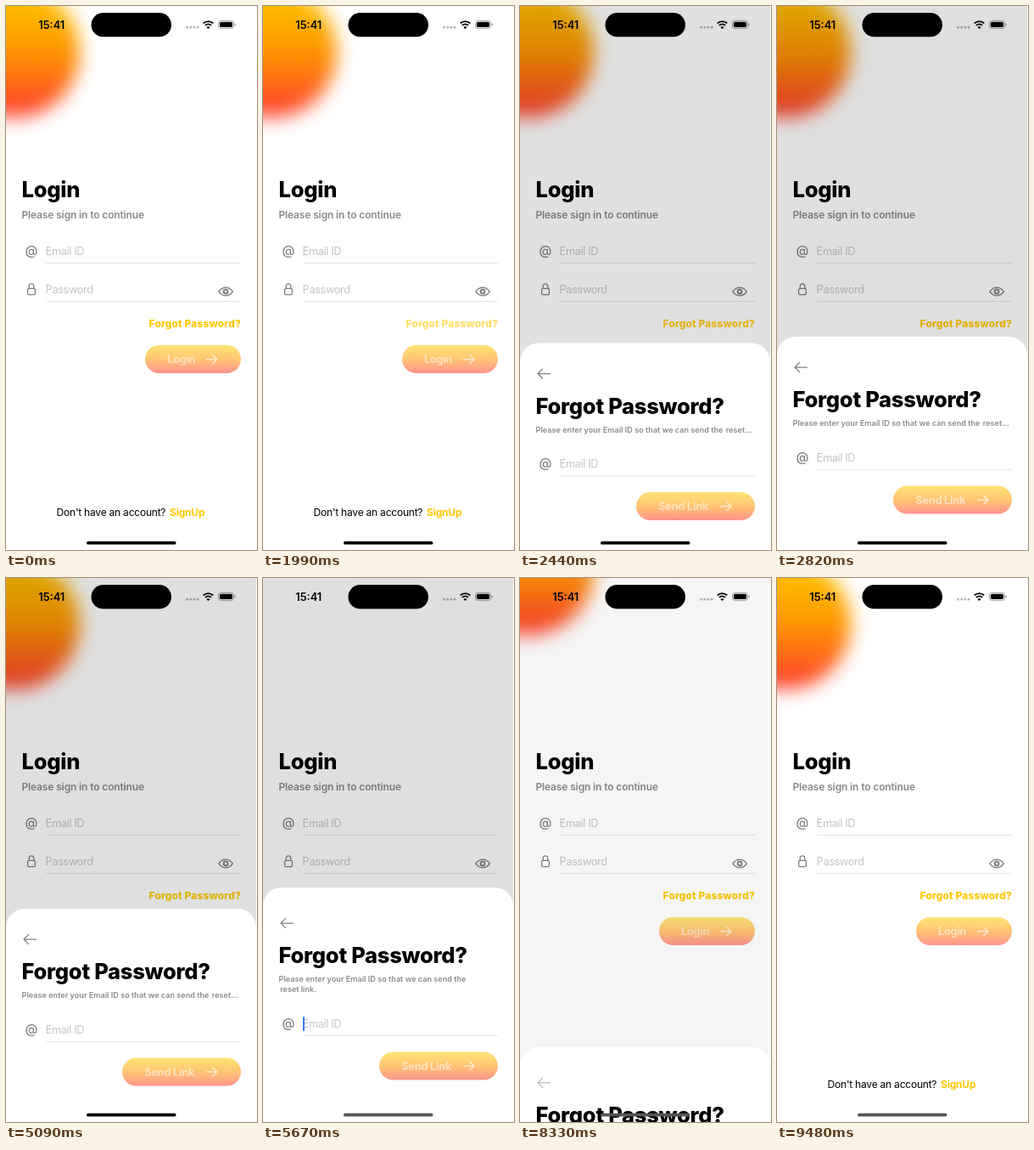
Animation, 296 px wide and 640 px high, one loop 9680 ms. Source, as an HTML page:

```html
<!DOCTYPE html>
<html lang="en">
<head>
<meta charset="utf-8">
<title>Login</title>
<style>
  html, body { margin: 0; width: 100%; height: 100%; overflow: hidden; background: #fff; }
  svg { display: block; font-family: Inter, "Liberation Sans", sans-serif; font-optical-sizing: none; }
  text { white-space: pre; }
  .title { font-size: 25.6px; font-weight: 800; letter-spacing: -.012em; }
  .lead { font-size: 12px; font-weight: 600; letter-spacing: -.011em; fill: #8a8a8e; }
  .hint { font-size: 12.8px; letter-spacing: -.03em; fill: #3c3c43; fill-opacity: .3; }
  .link { font-weight: 800; font-size: 12px; letter-spacing: .01em; fill: #ffc800; }
  .foot { font-size: 12.05px; letter-spacing: -.02em; }
  .foot.link { font-weight: 700; }
  .label { font-size: 12.8px; font-weight: 700; letter-spacing: -.02em; fill: #fff; fill-opacity: .5; }
  .note { font-size: 9.04px; font-weight: 600; letter-spacing: .004em; fill: #8a8a8e; }
  .clock { font-size: 12.8px; font-weight: 600; text-anchor: middle; }
  .at { font-size: 15.2px; font-weight: 500; fill: #808085; text-anchor: middle; }
  .icon { fill: none; stroke: #808085; stroke-width: 1.3; stroke-linecap: round; stroke-linejoin: round; }
  .iris { stroke-width: 2; }
  .rule { stroke: #000; stroke-opacity: .1; }
  .pill { fill: url(#warm); fill-opacity: .55; }
  .go { fill: none; stroke: #fff; stroke-opacity: .65; stroke-width: 1.5; stroke-linecap: round; stroke-linejoin: round; }
</style>
</head>
<body>
<svg width="296" height="640" viewBox="0 0 296 640">
  <defs>
    <linearGradient id="warm" x2="0" y2="1">
      <stop stop-color="#fc0"/>
      <stop offset=".5" stop-color="#ff9500"/>
      <stop offset="1" stop-color="#ff3b30"/>
    </linearGradient>
    <filter id="blur" x="-50%" y="-50%" width="200%" height="200%" color-interpolation-filters="sRGB">
      <feGaussianBlur stdDeviation="11.3"/>
    </filter>
    <path id="arrow" d="M-6.3 0H6M1 -5L6.2 0L1 5"/>
    <g id="email">
      <text class="at" x="30" y="4.6">@</text>
      <text class="hint" x="46.6" y="4.8">Email ID</text>
      <path class="rule" d="M47 14.5H277"/>
    </g>
  </defs>

  <rect width="296" height="640" fill="#fff"/>
  <g id="orb"><circle cx="10" cy="54" r="77" fill="url(#warm)" filter="url(#blur)"/></g>

  <text class="title" x="18.5" y="225">Login</text>
  <text class="lead" x="18.4" y="250.2">Please sign in to continue</text>
  <use href="#email" y="288"/>
  <g class="icon">
    <rect x="25.6" y="332.4" width="8.8" height="7.2" rx="1.4"/>
    <path d="M27.2 332.2V329.8a2.8 2.9 0 0 1 5.6 0v2.4"/>
    <path d="M250.8 336C255.5 329.6 262.7 329.6 267.4 336C262.7 342.4 255.5 342.4 250.8 336Z"/>
    <circle class="iris" cx="259.1" cy="336" r="2.4"/>
  </g>
  <text class="hint" x="46.6" y="337.6">Password</text>
  <path class="rule" d="M47 347.5H277"/>
  <text class="link" id="forgot" x="277" y="377.5" text-anchor="end">Forgot Password?</text>
  <rect class="pill" x="164" y="399" width="113" height="33" rx="16.5"/>
  <text class="label" x="190" y="420.3">Login</text>
  <use class="go" href="#arrow" x="242.7" y="415.7"/>
  <text class="foot" x="59.6" y="600.4">Don't have an account?</text>
  <text class="foot link" x="193" y="600.4">SignUp</text>

  <rect id="dim" width="295" height="640" opacity="0"/>

  <g id="sheet" transform="translate(0 640)">
    <path d="M0 320V22A22 22 0 0 1 22 0H273A22 22 0 0 1 295 22V320Z" fill="#fff"/>
    <g id="head">
      <path id="back" class="icon" d="M35.5 36H21M26.5 30.5L21 36L26.5 41.5"/>
      <text class="title" x="18.5" y="83.2">Forgot Password?</text>
      <text class="note" x="18.6" y="105">Please enter your Email ID so that we can send the</text>
    </g>
    <text class="note" id="wrap">reset<tspan id="dots">...</tspan></text>
    <text class="note" id="tail">link.</text>
    <g id="form">
      <use href="#email" y="142"/>
      <rect id="caret" x="47" y="134" width="2" height="17" rx="1" fill="#2f7cf0"/>
      <rect class="pill" x="137" y="175.5" width="140" height="33" rx="16.5"/>
      <text class="label" x="163.2" y="196.6">Send Link</text>
      <use class="go" href="#arrow" x="242.7" y="192"/>
    </g>
  </g>

  <text class="clock" x="53.8" y="26.6">15:41</text>
  <rect x="100.5" y="8.1" width="94.5" height="28.2" rx="14.1"/>
  <g fill="#000" fill-opacity=".28">
    <circle cx="213.6" cy="25" r="1.6"/><circle cx="217.8" cy="25" r="1.6"/>
    <circle cx="222" cy="25" r="1.6"/><circle cx="226.2" cy="25" r="1.6"/>
  </g>
  <path d="M232.7 20.4a8.4 8.4 0 0 1 11.6 0M234.9 22.9a5.2 5.2 0 0 1 7.2 0" fill="none" stroke="#000" stroke-width="1.9"/>
  <path d="M238.5 27l-2 -2a2.8 2.8 0 0 1 4 0z"/>
  <rect x="250.5" y="17.3" width="18" height="9.2" rx="3" fill="none" stroke="#000" stroke-opacity=".4" stroke-width=".9"/>
  <rect x="251.9" y="18.7" width="15.2" height="6.4" rx="1.8"/>
  <path d="M269.7 20.3a1.7 1.7 0 0 1 0 3.2z" fill-opacity=".45"/>
  <rect id="bar" x="95" y="629.8" width="105.5" height="3.8" rx="1.9"/>
</svg>
<script>
  const LOOP = 9680;
  // Bursts of motion: start, end, number of pictures
  const BURSTS = [[1990, 2660, 7], [5240, 6100, 9], [8110, 9070, 10]];
  const CARET = [[5350, 1], [6260, .5], [6360, 0], [6940, 1], [7180, .5], [7300, 0], [7840, .85], [7960, 1]];

  const $ = id => document.getElementById(id);
  const clamp = v => Math.min(1, Math.max(0, v));
  const mix = (a, b, k) => a + (b - a) * k;
  const move = (id, x, y) => $(id).setAttribute('transform', `translate(${x} ${y})`);
  const fade = (id, v) => $(id).setAttribute('opacity', v);

  // Critically damped spring, 0 to 1
  function spring(ms, rate) {
    const x = Math.max(0, ms) / 1000 * rate;
    return 1 - (1 + x) * Math.exp(-x);
  }

  // Hold the time on the picture shown within the latest burst
  function snap(t) {
    let held = 0;
    for (const [start, end, count] of BURSTS) {
      const gap = (end - start) / (count - 1);
      for (let i = 0; i < count; i++) {
        const at = Math.ceil((start + gap * i) / 10) * 10;
        if (at <= t) held = at;
      }
    }
    return held;
  }

  function draw(now) {
    const time = now % LOOP;
    const t = snap(time);
    const open = spring(t - 2063, 14);
    const lift = spring(t - 5200, 15);
    const close = spring(t - 8143, 12.57);
    const orb = lift - spring(t - 8143, 10.8);

    move('orb', 0, -160 * orb);
    fade('dim', .124 * open * (1 - close));
    move('sheet', 0, mix(mix(640, mix(388.5, 364, lift), open), 640, close));
    move('head', 0, 6 * lift);
    move('form', 0, 18 * lift);

    const wrapX = mix(242.8, 18.6, lift), wrapY = mix(105, 123.3, lift);
    move('wrap', wrapX, wrapY);
    move('tail', wrapX + 24.5, wrapY);
    $('dots').setAttribute('fill-opacity', clamp(1 - lift * 2));
    fade('tail', clamp(lift * 2 - 1));

    fade('forgot', t < 1990 ? 1 : mix(.6, 1, clamp((t - 2250) / 250)));
    fade('back', t < 8110 ? 1 : mix(.55, 1, clamp((t - 8350) / 250)));

    let caret = 0;
    for (const [at, v] of CARET) if (time >= at) caret = v;
    fade('caret', caret);

    const grey = 85 * clamp((time - 5090) / 400);
    $('bar').setAttribute('fill', `rgb(${grey},${grey},${grey})`);
  }

  const begin = performance.now();
  function tick() {
    draw(performance.now() - begin);
    requestAnimationFrame(tick);
  }
  tick();
</script>
</body>
</html>
```
